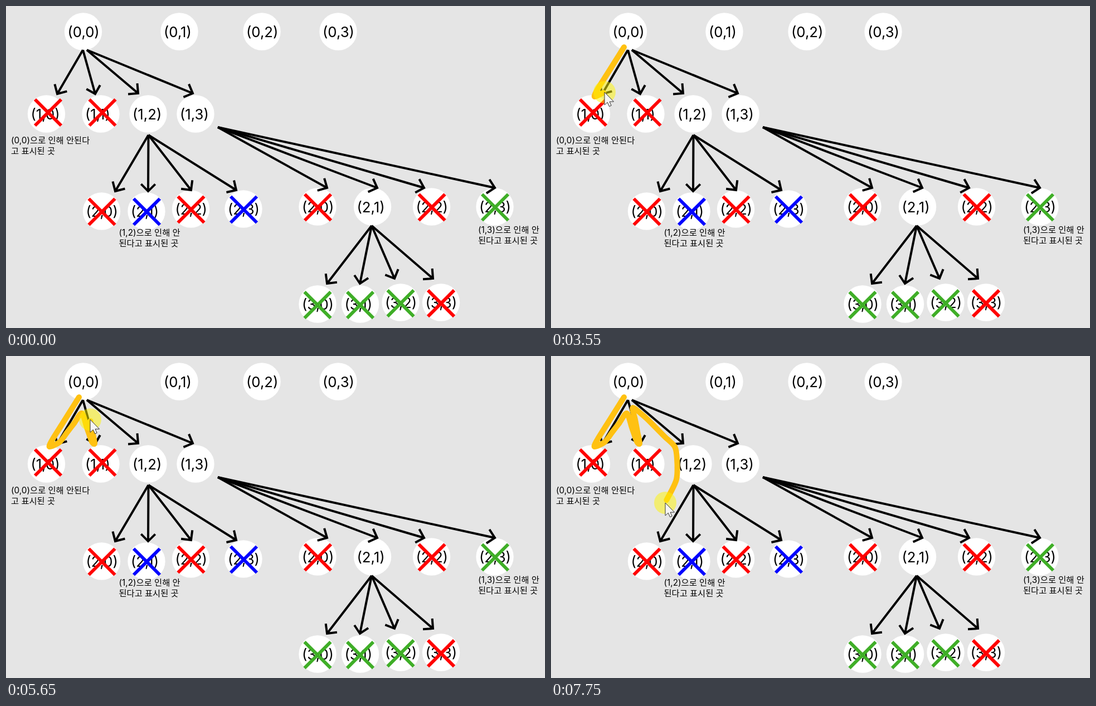
Animation, 967 px wide and 579 px high, one loop 8 s. Source, as an HTML page:

```html
<!DOCTYPE html>
<html lang="ko">
<head>
<meta charset="utf-8">
<title>Backtracking tree</title>
<style>
  html, body { margin: 0; width: 100%; height: 100%; overflow: hidden; background: #e5e5e5; }
  svg { display: block; width: 967px; height: 579px; }
  text { font-family: Inter, "Noto Sans CJK KR", "Noto Sans CJK", sans-serif; fill: #000; white-space: pre; }
  .label { font-size: 25.7px; }
  .note { font-size: 15.3px; }
  .node { fill: #fff; }
  .arrow { fill: none; stroke: #000; stroke-width: 4; }
  .cross { fill: none; stroke-width: 6; }
  #trail { fill: none; stroke-width: 10; stroke-linecap: round; stroke-linejoin: round; }
  #press { fill: #fff500; fill-opacity: .5; }
  #cursor { fill: #f6f6f6; stroke: #333; stroke-width: 1; }
</style>
</head>
<body>
<svg viewBox="0 0 967 579">
  <g id="tree"></g>
  <path id="trail"/>
  <g id="pointer">
    <circle id="press" r="20"/>
    <path id="cursor" d="M0 0V23L5.3 18.2L8.6 25.5L12.2 24L9 17H16.5Z"/>
  </g>
</svg>
<script>
const $ = id => document.getElementById(id);

function add(tag, attrs, content) {
  const el = document.createElementNS('http://www.w3.org/2000/svg', tag);
  for (const key in attrs) el.setAttribute(key, attrs[key]);
  if (content) el.textContent = content;
  $('tree').append(el);
}

function addNode(label, x, y) {
  add('circle', { class: 'node', cx: x, cy: y, r: 33.7 });
  add('text', { class: 'label', x: x - 28, y: y + 10.2 }, `(${label})`);
}

function addArrow(x1, y1, x2, y2) {
  const back = Math.atan2(y1 - y2, x1 - x2);
  const arm = turn => `${x2 + 18 * Math.cos(back + turn)} ${y2 + 18 * Math.sin(back + turn)}`;
  const d = `M${x1} ${y1}L${x2} ${y2}M${arm(Math.PI / 4)}L${x2} ${y2}L${arm(-Math.PI / 4)}`;
  add('path', { class: 'arrow', d });
}

function addCross(stroke, x, y) {
  add('path', { class: 'cross', stroke, d: `M${x - 23.5} ${y - 23.5}l47 47m0-47l-47 47` });
}

function addNote(x, y, ...lines) {
  lines.forEach((line, i) => add('text', { class: 'note', x, y: y + 19 * i }, line));
}

const COLORS = { R: '#ff0000', B: '#0000ff', G: '#3fae27' };

// Four columns each; paired values serve the left and right two columns.
// from/fromY: arrow start, tips/tipY: arrow ends, shift: cross offset
const families = [
  { row: 0, xs: [138.5, 311, 459, 596], y: [46, 46], marks: '    ' },
  { row: 1, xs: [72.5, 170, 255, 340], y: [194, 194], marks: 'RR  ', shift: [3, -2.5],
    from: [138, 145], fromY: 79, tips: [92, 160, 237, 335], tipY: [158, 157] },
  { row: 2, xs: [171.5, 252, 331.5, 426], y: [369, 365], marks: 'RBRB', shift: [.5, 1],
    from: [255.5, 255.5], fromY: 232, tips: [196, 255, 332, 413], tipY: [333, 331] },
  { row: 2, xs: [559, 657.5, 763.5, 877], y: [361, 361], marks: 'R RG', shift: [.5, 1],
    from: [380, 380], fromY: 218, tips: [576, 666, 750, 877], tipY: [327, 327] },
  { row: 3, xs: [559, 635.5, 708, 780.5], y: [536, 533], marks: 'GGGR', shift: [0, 1.7],
    from: [656, 656], fromY: 395, tips: [576, 635, 697, 766], tipY: [499, 490] }
];

for (const f of families) f.xs.forEach((x, i) => addNode(`${f.row},${i}`, x, f.y[i >> 1]));
for (const f of families) {
  f.xs.forEach((x, i) => {
    const side = i >> 1;
    if (f.tips) addArrow(f.from[side], f.fromY, f.tips[i], f.tipY[side]);
    if (f.marks[i] !== ' ') addCross(COLORS[f.marks[i]], x + f.shift[0], f.y[side] + f.shift[1]);
  });
}
addNote(9, 247, '(0,0)으로 인해 안된다', '고 표시된 곳');
addNote(202.5, 413, '(1,2)으로 인해 안', '된다고 표시된 곳');
addNote(847, 408, '(1,3)으로 인해 안', '된다고 표시된 곳');

const LOOP = 8000, START = 114, STEP = 263.1;
const PRESS = 8, WARM = 12;

// Turning points of the pointer: step, x, y
const turns = [
  [0, 374, 371], [2, 113, 43], [3, 128, 65], [5, 122, 82], [PRESS, 131, 74],
  [11, 84, 149], [12, 78, 163], [13, 96, 155], [16, 136, 103], [18, 154, 154],
  [19, 159, 157], [22, 147, 93], [23, 170, 111], [26, 222, 163], [27, 226, 185],
  [28, 225, 222], [29, 205, 264]
];

const mix = (a, b, u) => a.map((v, k) => v + (b[k] - v) * u);

function pose(step) {
  const next = Math.max(1, turns.findIndex(([s]) => s >= step));
  const [s0, ...a] = turns[next - 1];
  const [s1, ...b] = turns[next];
  return mix(a, b, (step - s0) / (s1 - s0));
}

// Smooth curve through the pressed steps, stopping just short of the tip
function trailPath(step) {
  if (step <= PRESS) return '';
  const p = [];
  for (let s = PRESS; s <= step; s++) p.push(pose(s));
  const n = p.length - 1;
  p[n] = mix(p[n], p[n - 1], .12);
  const at = i => p[Math.max(0, Math.min(n, i))];
  const handle = (i, dir) => at(i).map((v, k) => v + dir * (at(i + 1)[k] - at(i - 1)[k]) / 7);
  let d = 'M' + p[0];
  for (let i = 0; i < n; i++) d += `C${handle(i, 1)} ${handle(i + 1, -1)} ${p[i + 1]}`;
  return d;
}

function draw(now) {
  const step = Math.min(29, Math.floor((now % LOOP - START) / STEP));
  $('pointer').style.display = step < 0 ? 'none' : '';
  if (step >= 0) $('pointer').setAttribute('transform', `translate(${pose(step)})`);
  $('press').style.display = step < PRESS ? 'none' : '';
  $('trail').setAttribute('d', trailPath(step));
  $('trail').setAttribute('stroke', step < WARM ? '#ffd20c' : '#ffc112');
}

function tick() {
  draw(performance.now());
  requestAnimationFrame(tick);
}
tick();
</script>
</body>
</html>
```
